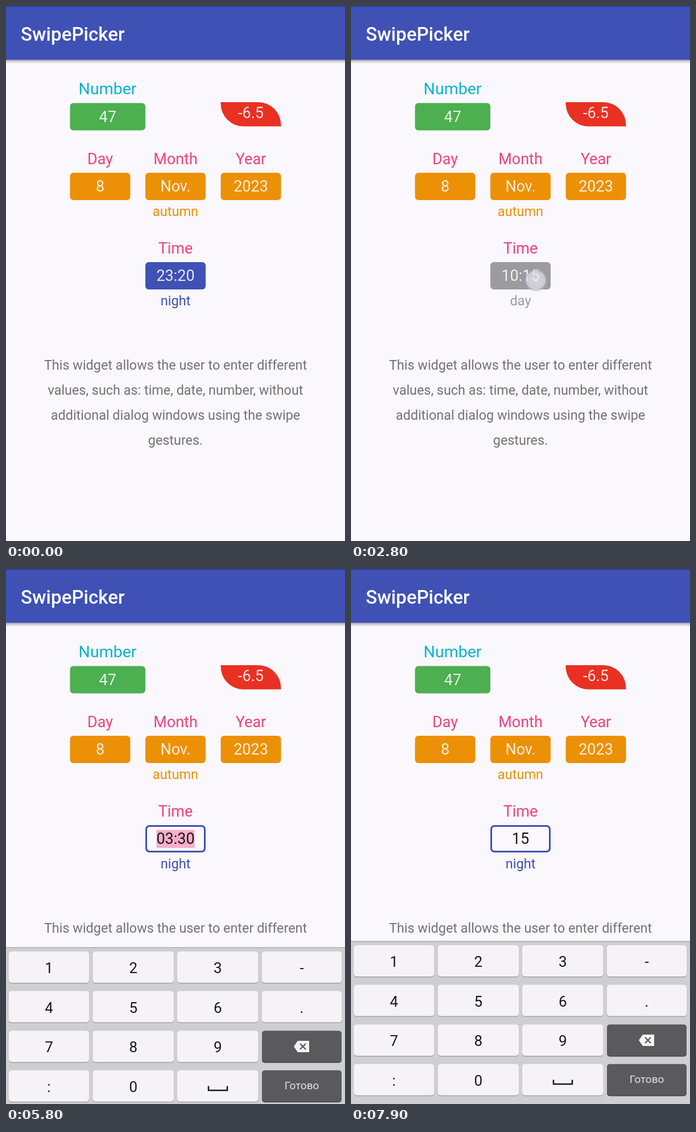
An HTML page with a canvas that plays this animation: 596x940 px, repeating every 8 s.

```html
<!DOCTYPE html>
<html lang="en">
<head>
<meta charset="utf-8">
<title>SwipePicker</title>
<style>
  html, body { margin: 0; width: 596px; height: 940px; overflow: hidden; }
  canvas { display: block; }
</style>
</head>
<body>
<canvas id="stage" width="596" height="940"></canvas>
<script>
const ctx = document.getElementById('stage').getContext('2d');
const LOOP = 8000;
const PAPER = '#faf8fc', INDIGO = '#3f51b5', GRAY = '#9c9b9d', ORANGE = '#ec9006', PINK = '#f0417f';
const LIGHT = 'rgba(255,255,255,.86)', INK = '#18181a';

// Horizontal swipes on the time field; the popup lingers until `hide`.
const swipes = [
  { press: 200, start: 300, end: 1000, hide: 1400, x: [300, 545], y: 474, time: [1400, 1995] },
  { press: 1500, start: 1600, end: 2000, hide: 2500, x: [250, 300], y: 476, time: [1995, 2055] },
  { press: 2750, start: 2850, end: 3400, hide: 3900, x: [325, 60], y: 482, time: [2055, 1650] }
];
const taps = [
  { from: 5300, to: 5500, x: 300, y: 472 },
  { from: 6900, to: 7050, x: 76, y: 690, key: '1' },
  { from: 7400, to: 7550, x: 224, y: 760, key: '5' }
];
const EDIT = 5550, KEYS_START = 5600, KEYS_END = 5850;

const clamp = v => Math.max(0, Math.min(1, v));
const smooth = v => { v = clamp(v); return v * v * (3 - 2 * v); };
const progress = (t, s) => smooth((t - s.start) / (s.end - s.start));
const mix = ([a, b], p) => a + (b - a) * p;

function text(str, x, y, size, color, align = 'center', weight = 400) {
  ctx.font = `${weight} ${size}px Roboto, sans-serif`;
  ctx.textAlign = align;
  ctx.fillStyle = color;
  ctx.fillText(str, x, y);
}

function box(x, y, w, h, radius, color) {
  ctx.beginPath();
  ctx.roundRect(x, y, w, h, radius);
  ctx.fillStyle = color;
  ctx.fill();
}

function polygon(color, ...points) {
  ctx.beginPath();
  points.forEach(([x, y]) => ctx.lineTo(x, y));
  ctx.fillStyle = color;
  ctx.fill();
}

function field(x, y, w, color, value) {
  box(x, y, w, 48, 6, color);
  text(value, x + w / 2, y + 33, 27, LIGHT);
}

function drawPage() {
  ctx.fillStyle = PAPER;
  ctx.fillRect(0, 0, 596, 940);
  const shade = ctx.createLinearGradient(0, 94, 0, 101);
  shade.addColorStop(0, 'rgba(0,0,0,.34)');
  shade.addColorStop(1, 'rgba(0,0,0,0)');
  ctx.fillStyle = shade;
  ctx.fillRect(0, 94, 596, 7);
  ctx.fillStyle = INDIGO;
  ctx.fillRect(0, 0, 596, 94.5);
  ctx.fillStyle = '#2f3f9f';
  ctx.fillRect(0, 0, 596, 1.5);
  text('SwipePicker', 26, 61, 33.1, '#fff', 'left', 500);

  text('Number', 178.5, 155, 28.5, '#08b4cf');
  field(112.5, 170.5, 132.5, '#4caf50', '47');
  box(377.5, 169, 106, 42.5, [0, 40, 0, 40], '#e83123');
  text('-6.5', 430.5, 197, 27, LIGHT);

  [['Day', '8', 112.5], ['Month', 'Nov.', 245], ['Year', '2023', 377.5]].forEach(([label, value, x]) => {
    text(label, x + 53, 278, 27, PINK);
    field(x, 293, 106, ORANGE, value);
  });
  text('autumn', 298, 369, 23.6, ORANGE);

  ['This widget allows the user to enter different',
   'values, such as: time, date, number, without',
   'additional dialog windows using the swipe',
   'gestures.'].forEach((line, i) => text(line, 298, 639 + i * 44, 23.4, '#737275'));
}

function drawTimeField(t) {
  const swipe = swipes.filter(s => t >= s.press).pop();
  const minutes = swipe ? Math.round(mix(swipe.time, progress(t, swipe)) / 5) * 5 : 1400;
  const hour = Math.floor(minutes / 60) % 24;
  const pad = n => String(n).padStart(2, '0');
  const clock = `${pad(hour)}:${pad(minutes % 60)}`;
  const night = hour < 6 || hour >= 22;
  const color = night ? INDIGO : GRAY;
  const popup = swipe && t >= swipe.start && t < swipe.hide;
  const editing = t >= EDIT;

  if (popup) {
    box(262, 391, 72, 37, 4, color);
    polygon(color, [290, 427], [306, 427], [298, 442]);
    text(clock, 298, 418, 24, LIGHT);
  } else {
    text('Time', 298, 435, 27, PINK);
  }

  if (popup || editing) {
    box(245, 450, 106, 48, 7, color);
    box(248, 453, 100, 42, 4.5, PAPER);
    const typed = taps.filter(k => k.key && t >= k.to).map(k => k.key).join('');
    if (editing && !typed) {
      ctx.fillStyle = '#f9aeca';
      ctx.fillRect(264.5, 458.5, 67, 31.5);
    }
    text(typed || clock, 298, 483, 27, INK);
  } else {
    field(245, 450, 106, color, clock);
  }
  text(night ? 'night' : 'day', 298, 526, 23.6, color);
}

function drawKeyboard(t) {
  const shown = clamp((t - KEYS_START) / (KEYS_END - KEYS_START));
  if (!shown) return;
  ctx.save();
  ctx.translate(0, 286 * (1 - shown) ** 2);
  ctx.fillStyle = '#cfced0';
  ctx.fillRect(0, 654, 596, 286);
  ctx.fillStyle = '#aaa9ab';
  ctx.fillRect(0, 653.5, 596, 1.5);
  const columns = [5, 152.5, 301, 450];
  [...'123-456.789<:0_>'].forEach((key, i) => {
    const x = columns[i % 4], y = 661 + (i >> 2) * 69.6;
    const w = i % 4 === 3 ? 140 : i % 4 ? 142.5 : 141;
    const dark = key === '<' || key === '>';
    const pressed = taps.some(p => p.key === key && t >= p.from && t < p.to);
    box(x, y + 1.5, w, 55, 5, dark ? '#444446' : '#a3a2a5');
    box(x, y, w, 55, 5, dark ? '#5a5a5c' : pressed ? '#d6d5d9' : '#f5f3f7');
    if (key === '<') drawBackspace();
    else if (key === '>') text('Готово', 520, 903, 19, '#e2e1e3');
    else if (key === '_') {
      ctx.strokeStyle = INK;
      ctx.lineWidth = 2.5;
      ctx.stroke(new Path2D('M356 897.5V905H389V897.5'));
    } else text(key, x + w / 2, y + 38, 26, INK);
  });
  ctx.restore();
}

function drawBackspace() {
  polygon('#f4f3f5', [506, 828], [513, 818], [533, 818], [533, 838], [513, 838]);
  ctx.strokeStyle = '#59595b';
  ctx.lineWidth = 2.4;
  ctx.stroke(new Path2D('M517 823L527 833M527 823L517 833'));
}

function drawTouch(x, y) {
  const glow = ctx.createRadialGradient(x, y, 0, x, y, 20);
  glow.addColorStop(0, 'rgba(238,236,240,.72)');
  glow.addColorStop(.8, 'rgba(222,222,230,.72)');
  glow.addColorStop(.9, 'rgba(160,168,215,.6)');
  glow.addColorStop(1, 'rgba(200,204,230,0)');
  ctx.fillStyle = glow;
  ctx.fillRect(x - 20, y - 20, 40, 40);
}

function draw(now) {
  const t = now % LOOP;
  drawPage();
  drawTimeField(t);
  drawKeyboard(t);
  swipes.filter(s => t >= s.press && t < s.end + 50)
    .forEach(s => drawTouch(mix(s.x, progress(t, s)), s.y));
  taps.filter(p => t >= p.from && t < p.to).forEach(p => drawTouch(p.x, p.y));
  requestAnimationFrame(draw);
}
requestAnimationFrame(draw);
</script>
</body>
</html>
```
